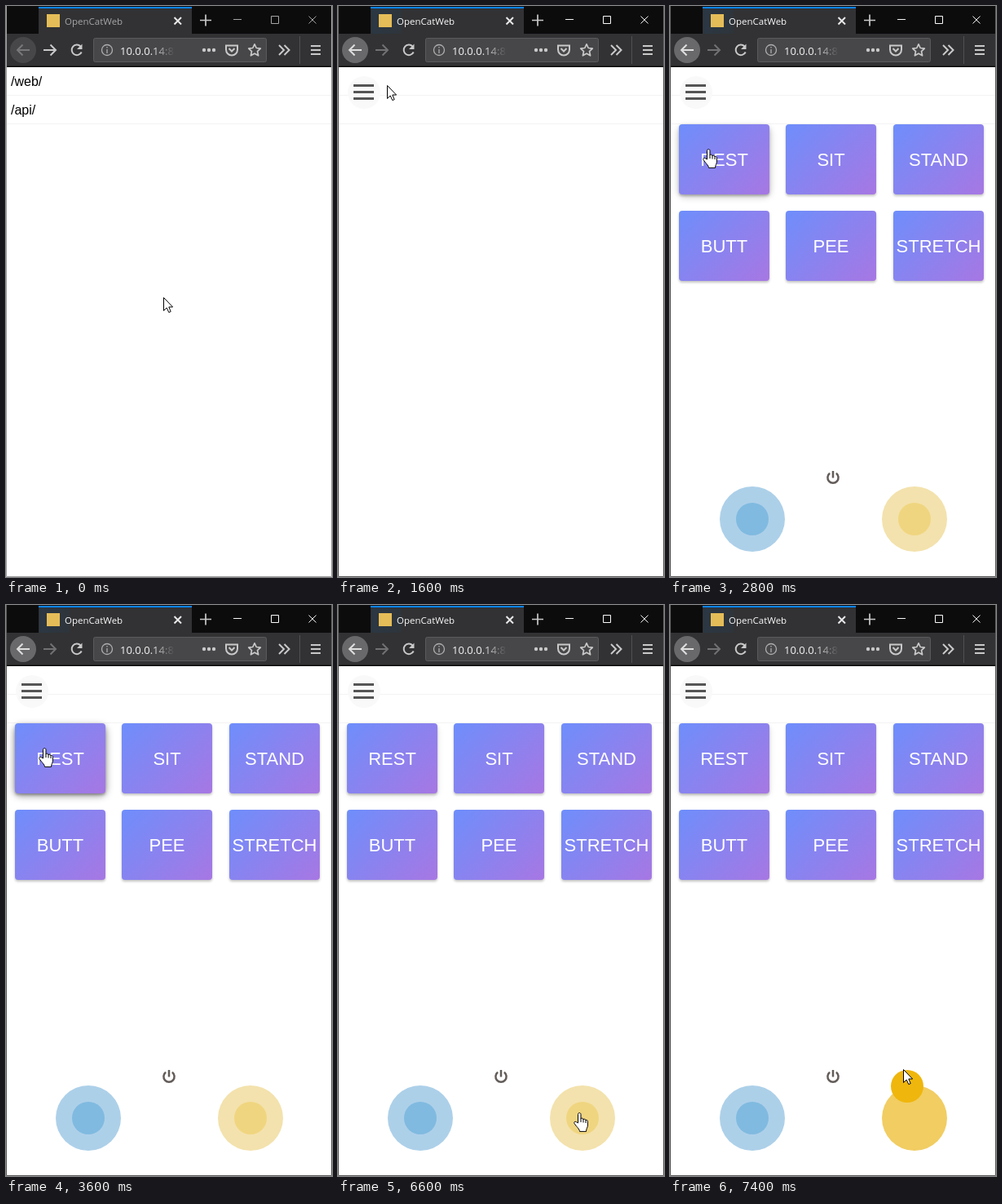
Recreate the animation shown at these times as an HTML page. Size 400x700 px, loop 8000 ms.

```html
<!DOCTYPE html>
<html lang="en">
<head>
<meta charset="utf-8">
<title>OpenCatWeb</title>
<style>
html, body { margin: 0; width: 100%; height: 100%; overflow: hidden; background: #fff; }
svg { display: block; width: 400px; height: 700px; }

.ui { font-family: "Open Sans", "Noto Sans", sans-serif; }
.page { font-family: "Liberation Sans", Arial, sans-serif; }
.line { fill: none; stroke: currentColor; }
.icons { color: #c9c9ca; stroke-width: 2; }
.button text { font-size: 22px; fill: #fff; text-anchor: middle; }
.button rect { filter: drop-shadow(0 2px 1.5px rgba(0, 0, 0, .24)); }

/* Every change is a hard cut on one shared 8 s clock. */
.step { animation: 8s step-end infinite; }
.focus { animation-name: focus; }
.border { animation-name: border; }
.back { animation-name: back; }
.backDisc { animation-name: backDisc; }
.forward { animation-name: forward; }
.list { animation-name: list; }
.status { animation-name: status; }
.menu { animation-name: menu; }
.burst { animation-name: burst; }
.controls { animation-name: controls; }
.lift { animation-name: lift; }
.ripple { animation-name: ripple; }
.move { animation-name: move; }
.arrow { animation-name: arrow; }
.hand { animation-name: hand; }
.base { animation-name: base; }
.knob { animation-name: knob; }

@keyframes focus { 0% { color: #a5a5a6; } 15%, 100% { color: #f9f9fa; } }
@keyframes border { 0% { color: #a0a0a0; } 15%, 100% { color: #5c5c5d; } }
@keyframes back { 0% { color: #78787a; } 17.5%, 100% { color: #dededf; } }
@keyframes backDisc { 0% { fill: #47474a; } 17.5%, 100% { fill: #69696b; } }
@keyframes forward { 0% { color: #c9c9ca; } 17.5%, 100% { color: #717173; } }
@keyframes list { 0% { opacity: 1; } 17.5%, 100% { opacity: 0; } }
@keyframes status { 0% { opacity: 0; } 12.5% { opacity: 1; } 17.5%, 100% { opacity: 0; } }
@keyframes menu { 0% { opacity: 0; } 17.5%, 100% { opacity: 1; } }
@keyframes burst { 0% { opacity: 0; } 17.5% { opacity: .8; } 20%, 100% { opacity: .3; } }
@keyframes controls { 0% { opacity: 0; } 22.5%, 100% { opacity: 1; } }
@keyframes lift {
  0% { opacity: 0; } 35% { opacity: .55; } 37.5% { opacity: 1; }
  77.5%, 100% { opacity: .22; }
}
@keyframes ripple { 0% { opacity: 0; } 42.5% { opacity: .3; } 45%, 100% { opacity: 0; } }
@keyframes base {
  0% { fill: #f3e2ad; } 87.5% { fill: #f2d888; } 90%, 100% { fill: #f1cd62; }
}
@keyframes knob {
  0% { fill: #f0d580; transform: translate(300px, 629px); }
  87.5% { fill: #efc647; transform: translate(300px, 629px); }
  90% { fill: #efb60d; transform: translate(296px, 623px); }
  92.5%, 100% { fill: #efb60d; transform: translate(291px, 590px); }
}
@keyframes move {
  0% { transform: translate(193px, 357px); }
  2.5% { transform: translate(156px, 292px); }
  5% { transform: translate(120px, 236px); }
  7.5% { transform: translate(69px, 135px); }
  10% { transform: translate(6px, 86px); }
  12.5% { transform: translate(14px, 84px); }
  17.5% { transform: translate(60px, 98px); }
  20% { transform: translate(60px, 97px); }
  30% { transform: translate(57px, 100px); }
  32.5% { transform: translate(50px, 141px); }
  35% { transform: translate(40px, 175px); }
  72.5% { transform: translate(40px, 177px); }
  75% { transform: translate(193px, 398px); }
  77.5% { transform: translate(263px, 549px); }
  80% { transform: translate(285px, 612px); }
  82.5% { transform: translate(289px, 622px); }
  90% { transform: translate(293px, 587px); }
  92.5%, 100% { transform: translate(286px, 569px); }
}
@keyframes arrow {
  0%, 17.5%, 75%, 90%, 100% { opacity: 1; }
  7.5%, 35%, 80% { opacity: 0; }
}
@keyframes hand {
  0%, 17.5%, 75%, 90%, 100% { opacity: 0; }
  7.5%, 35%, 80% { opacity: 1; }
}
</style>
</head>
<body>
<svg viewBox="0 0 400 700">
  <defs>
    <linearGradient id="violet" gradientUnits="userSpaceOnUse" x1="6.25" y1="-6.25" x2="104.75" y2="92.25">
      <stop stop-color="#6e8efb"/><stop offset="1" stop-color="#a777e3"/>
    </linearGradient>
    <linearGradient id="fade" gradientUnits="userSpaceOnUse" x1="178" y1="0" x2="207" y2="0">
      <stop stop-color="#f4f4f5"/><stop offset="1" stop-color="#f4f4f5" stop-opacity="0"/>
    </linearGradient>
    <linearGradient id="glow">
      <stop stop-color="#0a5590" stop-opacity=".55"/><stop offset="1" stop-color="#0a5590" stop-opacity=".25"/>
    </linearGradient>
    <filter id="soft" x="-20%" y="-20%" width="140%" height="150%"><feGaussianBlur stdDeviation="4"/></filter>
  </defs>

  <rect width="400" height="700" fill="#fff"/>

  <g class="page">
    <path d="M1 109.5H399M1 144.5H399" stroke="#f3f3f3"/>
    <g class="step list" font-size="16">
      <text x="6" y="98">/web/</text>
      <text x="6" y="133">/api/</text>
    </g>
    <g class="step menu">
      <circle cx="32" cy="106" r="20" fill="#f9f9f9"/>
      <path d="M19 97.5H44M19 105.5H44M19 113.5H44" stroke="#555" stroke-width="3"/>
    </g>
    <g class="step controls">
      <g class="step lift">
        <rect x="10" y="148" width="113" height="86" rx="8" fill="#000" fill-opacity=".42" filter="url(#soft)"/>
      </g>
      <g id="buttons"></g>
      <circle class="step ripple" cx="46.5" cy="175" r="16" fill="#fff"/>
      <g class="line" color="#635c59" stroke-width="2.5">
        <path d="M196.1 572.8A6.6 6.6 0 1 0 203.9 572.8"/>
        <path d="M200 570V578.5"/>
      </g>
      <circle cx="101" cy="629" r="40" fill="#add0e9"/>
      <circle cx="101" cy="629" r="20" fill="#80bae0"/>
      <circle class="step base" cx="300" cy="629" r="40"/>
      <circle class="step knob" r="20"/>
    </g>
  </g>

  <g class="ui">
    <rect width="400" height="35" fill="#0c0c0d"/>
    <rect x="40" y="1" width="188" height="34" fill="#323234"/>
    <rect class="step burst" x="41" y="3" width="37" height="31" fill="url(#glow)"/>
    <rect x="40" y="1" width="188" height="2" fill="#0a84ff"/>
    <rect x="50" y="10" width="16" height="16" fill="#e5bd58"/>
    <g class="step focus">
      <text x="72" y="23" font-size="11.5" fill="currentColor">OpenCatWeb</text>
      <path class="line" d="M279 16.5H289M325.5 12.5H334.5V21.5H325.5ZM371.5 12.5L380.5 21.5M380.5 12.5L371.5 21.5"/>
    </g>
    <path class="line" color="#e8e8e9" stroke-width="2" d="M206.5 14L215 22.5M215 14L206.5 22.5"/>
    <path class="line" color="#c9c9ca" stroke-width="1.7" d="M238 17.5H252M245 10.5V24.5"/>

    <rect y="34" width="400" height="40" fill="#323234"/>
    <rect y="73.5" width="400" height="1.5" fill="#0c0c0d"/>
    <circle class="step backDisc" cx="21" cy="54" r="16"/>
    <path class="line step back" stroke-width="2" d="M29 54H14M20.5 47.5L14 54L20.5 60.5"/>
    <path class="line step forward" stroke-width="2" d="M46 54H61M54.5 47.5L61 54L54.5 60.5"/>
    <rect x="107.5" y="39.5" width="212" height="29" rx="2" fill="#474749" stroke="#5a5a5c"/>
    <text x="140" y="59.5" font-size="13" fill="url(#fade)">10.0.0.14:8</text>
    <g class="icons">
      <path class="line" d="M91.5 49.5A6.3 6.3 0 1 0 92.7 56.5"/>
      <path d="M93.5 46.5V53H87Z" fill="currentColor"/>
      <g class="line" color="#aeaeaf" stroke-width="1.3">
        <circle cx="124" cy="54" r="6.5"/><path d="M124 53V58M124 50V51.5"/>
      </g>
      <g fill="currentColor">
        <circle cx="243" cy="54" r="2.2"/><circle cx="249" cy="54" r="2.2"/><circle cx="255" cy="54" r="2.2"/>
      </g>
      <path class="line" d="M270 48.5H284V53.5A7 7 0 0 1 270 53.5ZM273.5 52L277 55.5L280.5 52"/>
      <path class="line" stroke-width="1.7" stroke-linejoin="round"
        d="M305 46.8L307.2 51.5L312.3 52.1L308.5 55.6L309.6 60.8L305 58.2L300.4 60.8L301.5 55.6L297.7 52.1L302.8 51.5Z"/>
      <path class="line" d="M335 48L341 54L335 60M341.5 48L347.5 54L341.5 60"/>
      <path class="line" d="M374 49H386M374 54H386M374 59H386"/>
    </g>
    <path d="M360.5 37V71" stroke="#505052"/>

    <g class="step status">
      <rect x="1" y="681" width="113" height="18" fill="#323234"/>
      <text x="5" y="694" font-size="10.5" fill="#f9f9fa">10.0.0.14:8080/web</text>
    </g>
  </g>
  <path class="line step border" d="M.5 0V699.5H399.5V0"/>

  <g class="step move" fill="#fff" stroke="#000" stroke-linejoin="round">
    <path class="step arrow" d="M.5 .5V16.5L4.2 13L6.8 18.6L9.2 17.6L6.8 12H11.6Z"/>
    <g class="step hand">
      <path d="M5.5 13V2.5C5.5 0 9 0 9 2.5V8C9 6.6 12 6.8 12 9C12 7.6 15 8 15 10C15 8.8 17.4 9 17.4 11.2V16C17.4 18.5 15.5 20 15.5 23.4H7.5C7.5 20.5 3 17 1 13.5C0 11.3 2.6 10.6 4 12.2Z"/>
      <path d="M9 8V12M12 9V12.5M15 10V13" fill="none"/>
    </g>
  </g>
</svg>
<script>
const labels = ["REST", "SIT", "STAND", "BUTT", "PEE", "STRETCH"];
const columns = [11, 142, 274];
document.getElementById("buttons").innerHTML = labels.map((label, i) => `
  <g class="button" transform="translate(${columns[i % 3]} ${i < 3 ? 145 : 251})">
    <rect width="111" height="86" rx="4" fill="url(#violet)"/>
    <text x="55.5" y="51">${label}</text>
  </g>`).join("");
</script>
</body>
</html>
```
